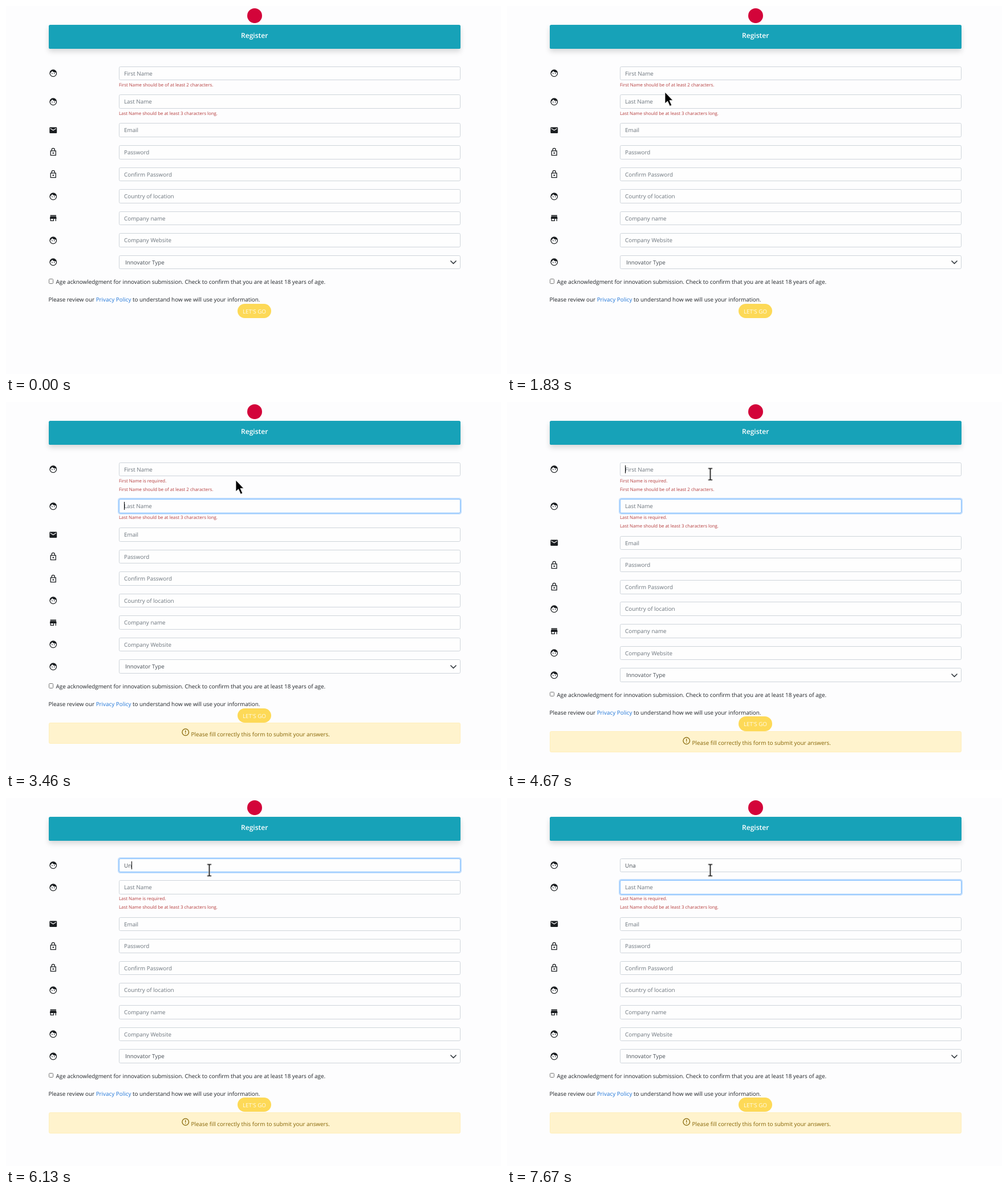
These frames come from a looping animation (868x645 px, 8000 ms). An HTML page:

```html
<!DOCTYPE html>
<html lang="en">
<head>
<meta charset="utf-8">
<title>Register</title>
<style>
* { box-sizing: border-box; }
html, body { margin: 0; width: 100%; height: 100%; overflow: hidden; }
body {
  position: relative; background: #fdfdfe; color: #212529;
  font: 9.9px/16px "Open Sans", "Noto Sans", sans-serif;
  text-rendering: geometricPrecision; white-space: nowrap;
}
.logo { position: absolute; left: 423px; top: 4px; width: 26px; height: 26px; border-radius: 50%; background: #d3043a; }
.head {
  position: absolute; left: 74.5px; top: 33px; width: 722.5px; height: 41.5px;
  border-radius: 2.6px; background: #17a2b8; color: #fff;
  box-shadow: 0 5px 10px rgba(0, 0, 0, .15);
  font-size: 12.1px; font-weight: 600; line-height: 37px; text-align: center;
}
.form { position: absolute; left: 0; top: 105.6px; width: 868px; }

/* Rows */
.row { position: relative; height: 38.57px; }
.icon { position: absolute; left: 74.5px; top: 4.5px; width: 15.5px; height: 15.5px; color: #1b1e21; }
.field {
  position: absolute; left: 198px; top: 0; width: 599px; height: 24.6px; padding-left: 8px;
  border: 1px solid #ced4da; border-radius: 2.6px; background: #fefefe;
  color: #495057; font-size: 9.85px; line-height: 23px;
}
.hint { color: #6c757d; }
.field .hint { position: absolute; left: 8px; top: 0; }
.select { padding-left: 10px; }
.chevron { position: absolute; right: 6.5px; top: 8.5px; width: 11px; height: 7px; }
.ring::after {
  content: ""; position: absolute; inset: -1px; border-radius: 2.6px;
  border: 1px solid #80bdff; box-shadow: 0 0 0 2px rgba(0, 123, 255, .25); opacity: 0;
}
.caret { position: absolute; top: 4px; width: 1px; height: 14px; background: #000; opacity: 0; }
.typed { position: relative; }
.typed b { font-weight: 400; font-size: 0; }
.errors { position: absolute; left: 198px; top: 26.3px; color: #b53c3c; font-size: 7.88px; line-height: 14.8px; }
.errors div { height: 14.8px; overflow: hidden; }
.errors .need { height: 0; }

/* Footer */
.foot > * { position: absolute; }
.foot { position: relative; }
.box { left: 74.5px; top: 3px; width: 8.5px; height: 8.5px; border: 1px solid #767676; border-radius: 1.6px; background: #fff; }
.age { left: 87.5px; top: 0; }
.policy { left: 74.5px; top: 31px; }
.policy span { color: #2277d8; }
.go {
  left: 406px; top: 46.6px; width: 59px; height: 25.2px; border-radius: 13px;
  background: #fdd957; color: #fffbea; line-height: 26px; text-align: center;
}
.alert {
  left: 74.5px; top: 72px; width: 722.5px; height: 36.4px; padding-left: 249px;
  border: 1px solid #ffeeba; border-radius: 2.6px; background: #fff3cd;
  color: #856404; line-height: 38.5px; opacity: 0;
}
.alert svg { position: absolute; left: 231px; top: 8px; width: 15.5px; height: 15.5px; }

/* Pointer */
.mouse { position: absolute; left: 0; top: 0; width: 1px; height: 1px; overflow: visible; }

/* Timeline: 1% = 80 ms */
.r1, .r2, .errors *, .alert, .caret, .typed b, .first .hint, .arrow, .beam { animation: 8s step-end infinite; }
.r1 { animation-name: row1; }
.r2 { animation-name: row2; }
.r1 .need { animation-name: need1; }
.r2 .need { animation-name: need2; }
.r1 .short { animation-name: short1; }
.alert { animation-name: alert; }
.first .caret { animation-name: caret1; }
.last .caret { animation-name: caret2; }
.first .hint { animation-name: hint; }
.typed b:nth-child(1) { animation-name: key1; }
.typed b:nth-child(2) { animation-name: key2; }
.typed b:nth-child(3) { animation-name: key3; }
.first::after { animation: ring1 8s ease-in-out infinite; }
.last::after { animation: ring2 8s ease-in-out infinite; }
.mouse { animation: move 8s linear infinite; }
.arrow { animation-name: arrow; }
.beam { animation-name: beam; }

@keyframes row1 { 0% { height: 49.9px } 41.125% { height: 64.6px } 75.5% { height: 38.57px } }
@keyframes row2 { 0% { height: 49.9px } 58.375% { height: 64.6px } }
@keyframes need1 { 0% { height: 0 } 41.125% { height: 14.8px } 75.5% { height: 0 } }
@keyframes need2 { 0% { height: 0 } 58.375% { height: 14.8px } }
@keyframes short1 { 0% { opacity: 1 } 75.5% { opacity: 0 } }
@keyframes alert { 0% { opacity: 0 } 41.125% { opacity: 1 } }
@keyframes hint { 0% { opacity: 1 } 69.75% { opacity: 0 } }
@keyframes key1 { 0% { font-size: 0 } 69.75% { font-size: 9.85px } }
@keyframes key2 { 0% { font-size: 0 } 75.5% { font-size: 9.85px } }
@keyframes key3 { 0% { font-size: 0 } 77.125% { font-size: 9.85px } }
@keyframes caret1 {
  0%, 37.5%, 64.625%, 83.375% { opacity: 0 }
  31.25%, 58.375%, 69.75% { opacity: 1 }
}
@keyframes caret2 {
  0%, 47.375%, 58.375%, 95.875% { opacity: 0 }
  41.125%, 53.625%, 89.625% { opacity: 1 }
}
@keyframes ring1 {
  0%, 31.25%, 43%, 58.375%, 91.5%, 100% { opacity: 0 }
  33.125%, 41.125%, 60.25%, 89.625% { opacity: 1 }
}
@keyframes ring2 {
  0%, 41.125%, 60.25%, 89.625% { opacity: 0 }
  43%, 58.375%, 91.5%, 100% { opacity: 1 }
}
@keyframes move {
  0%, 9.75% { transform: translate(390px, 660px) }
  10.375% { transform: translate(383px, 622px) }
  13.5%, 15.6% { transform: translate(138px, 508px) }
  18.25%, 20.4% { transform: translate(297px, 181px) }
  22.875%, 23.5% { transform: translate(277px, 151px) }
  29.125%, 31.25% { transform: translate(340px, 120px) }
  38%, 51% { transform: translate(403px, 137px) }
  55.25%, 100% { transform: translate(356.5px, 126.5px) }
}
@keyframes arrow { 0% { opacity: 1 } 27.5% { opacity: 0 } 35.5% { opacity: 1 } 53.5% { opacity: 0 } }
@keyframes beam { 0% { opacity: 0 } 27.5% { opacity: 1 } 35.5% { opacity: 0 } 53.5% { opacity: 1 } }
</style>
</head>
<body>
<svg width="0" height="0" style="position:absolute">
  <symbol id="face" viewBox="0 0 24 24">
    <circle cx="12" cy="12" r="9" fill="none" stroke="currentColor" stroke-width="2"/>
    <circle cx="9" cy="13" r="1.25" fill="currentColor"/>
    <circle cx="15" cy="13" r="1.25" fill="currentColor"/>
    <path fill="currentColor" d="M3 12Q7.5 10 9.26 5.77C11 8.3 14 10 17.4 10Q19 10 20.6 9.5A9 9 0 0 0 3 12Z"/>
  </symbol>
  <symbol id="mail" viewBox="0 0 24 24">
    <path fill="currentColor" fill-rule="evenodd" d="M4 4H20Q22 4 22 6V18Q22 20 20 20H4Q2 20 2 18V6Q2 4 4 4ZM20 8V6L12 11L4 6V8L12 13Z"/>
  </symbol>
  <symbol id="lock" viewBox="0 0 24 24">
    <path fill="none" stroke="currentColor" stroke-width="2" d="M5 9H19V21H5ZM8 9V6A4 4 0 0 1 16 6V9"/>
    <circle cx="12" cy="15" r="2" fill="currentColor"/>
  </symbol>
  <symbol id="shop" viewBox="0 0 24 24">
    <path fill="currentColor" fill-rule="evenodd" d="M4 4H20V6H4ZM4 7H20L21 12V14H20V20H18V14H14V20H4V14H3V12ZM6 14V18H12V14Z"/>
  </symbol>
</svg>

<div class="logo"></div>
<div class="head">Register</div>

<div class="form">
  <div class="row r1">
    <svg class="icon"><use href="#face"/></svg>
    <div class="field ring first"><span class="hint">First Name</span><span class="typed"><b>U</b><b>n</b><b>a</b></span><i class="caret"></i></div>
    <div class="errors">
      <div class="need">First Name is required.</div>
      <div class="short">First Name should be of at least 2 characters.</div>
    </div>
  </div>
  <div class="row r2">
    <svg class="icon"><use href="#face"/></svg>
    <div class="field ring last"><i class="caret"></i><span class="hint">Last Name</span></div>
    <div class="errors">
      <div class="need">Last Name is required.</div>
      <div>Last Name should be at least 3 characters long.</div>
    </div>
  </div>
  <div class="row"><svg class="icon"><use href="#mail"/></svg><div class="field hint">Email</div></div>
  <div class="row"><svg class="icon"><use href="#lock"/></svg><div class="field hint">Password</div></div>
  <div class="row"><svg class="icon"><use href="#lock"/></svg><div class="field hint">Confirm Password</div></div>
  <div class="row"><svg class="icon"><use href="#face"/></svg><div class="field hint">Country of location</div></div>
  <div class="row"><svg class="icon"><use href="#shop"/></svg><div class="field hint">Company name</div></div>
  <div class="row"><svg class="icon"><use href="#face"/></svg><div class="field hint">Company Website</div></div>
  <div class="row">
    <svg class="icon"><use href="#face"/></svg>
    <div class="field select">Innovator Type
      <svg class="chevron" viewBox="0 0 11 7"><path d="M1 1L5.5 5.5L10 1" fill="none" stroke="#343a40" stroke-width="1.7" stroke-linecap="round" stroke-linejoin="round"/></svg>
    </div>
  </div>

  <div class="foot">
    <div class="box"></div>
    <div class="age">Age acknowledgment for innovation submission. Check to confirm that you are at least 18 years of age.</div>
    <div class="policy">Please review our <span>Privacy Policy</span> to understand how we will use your information.</div>
    <div class="go">LET'S GO</div>
    <div class="alert">
      <svg viewBox="0 0 24 24"><circle cx="12" cy="12" r="9" fill="none" stroke="currentColor" stroke-width="2"/><path d="M12 7V13M12 15V17" stroke="currentColor" stroke-width="2"/></svg>Please fill correctly this form to submit your answers.
    </div>
  </div>
</div>

<svg class="mouse">
  <path class="arrow" d="M0 0V20L4.6 15.8L8.5 24.4L11.8 23L8 14.4H13.8Z" fill="#000" stroke="#fff" stroke-width=".8"/>
  <g class="beam" fill="none">
    <path d="M-3.5 -10H-1Q0 -10 0 -9Q0 -10 1 -10H3.5M0 -9V9M-3.5 10H-1Q0 10 0 9Q0 10 1 10H3.5" stroke="#fff" stroke-width="3"/>
    <path d="M-3.5 -10H-1Q0 -10 0 -9Q0 -10 1 -10H3.5M0 -9V9M-3.5 10H-1Q0 10 0 9Q0 10 1 10H3.5" stroke="#000" stroke-width="1.6"/>
  </g>
</svg>
</body>
</html>
```
